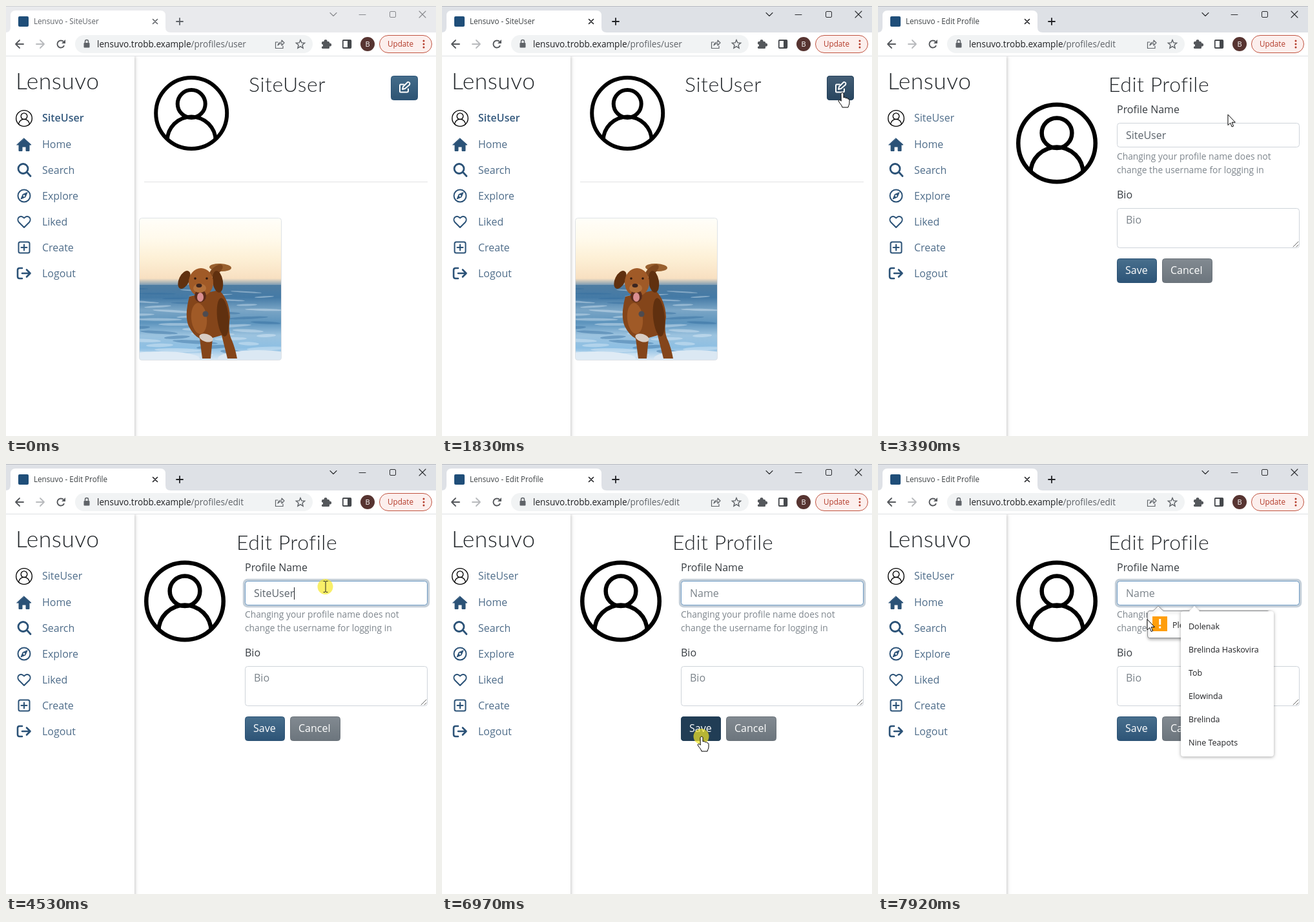
Recreate the animation shown at these times as an HTML page with a canvas. Size 666 by 666 pixels, loop 7.99 s.

```html
<!DOCTYPE html>
<html lang="en">
<head>
<meta charset="utf-8">
<title>Profile editor</title>
<style>
  html, body { margin: 0; width: 100%; height: 100%; overflow: hidden; background: #fff; }
  canvas { display: block; width: 666px; height: 666px; }
</style>
</head>
<body>
<canvas id="stage" width="666" height="666"></canvas>
<script>
const c = document.getElementById('stage').getContext('2d');
const LOOP = 7990;
const UI = '"Open Sans", "Noto Sans", sans-serif';
const HEAD = 'Lato, "Open Sans", sans-serif';
const APP = 'Lensuvo', USER = 'SiteUser', HOST = 'lensuvo.trobb.example';
const NAVY = '#2b5277', INK = '#212529', SOFT = '#383d42', GREY = '#5f6368';

const clamp = v => Math.max(0, Math.min(1, v));
const span = (t, a, b) => clamp((t - a) / (b - a));
const ease = p => p * p * (3 - 2 * p);
const mix = (a, b, p) => a + (b - a) * p;

function text(s, x, y, size, color, weight = 400, font = UI) {
  c.font = `${weight} ${size}px ${font}`;
  c.fillStyle = color;
  c.fillText(s, x, y);
  return c.measureText(s).width;
}
function heading(s, x, y, size) {
  c.letterSpacing = '0.5px';
  text(s, x, y, size, INK, 300, HEAD);
  c.letterSpacing = '0px';
}
function rect(x, y, w, h, color) {
  c.fillStyle = color;
  c.fillRect(x, y, w, h);
}
function round(x, y, w, h, r, fill, stroke, lw = 1) {
  c.beginPath();
  c.roundRect(x, y, w, h, r);
  if (fill) { c.fillStyle = fill; c.fill(); }
  if (stroke) { c.strokeStyle = stroke; c.lineWidth = lw; c.stroke(); }
}
function oval(x, y, rx, ry, turn, color) {
  c.beginPath();
  c.ellipse(x, y, rx, ry, turn, 0, 7);
  c.fillStyle = color;
  c.fill();
}
const disc = (x, y, r, color) => oval(x, y, r, r, 0, color);
// SVG path at an offset, filled and/or stroked
function shape(d, x, y, fill, stroke, lw = 2) {
  const p = new Path2D(d);
  c.save();
  c.translate(x, y);
  c.lineJoin = c.lineCap = 'round';
  if (fill) { c.fillStyle = fill; c.fill(p); }
  if (stroke) { c.strokeStyle = stroke; c.lineWidth = lw; c.stroke(p); }
  c.restore();
}
const line = (d, x, y, color, lw) => shape(d, x, y, null, color, lw);
function fade(y0, y1, ...colors) {
  const g = c.createLinearGradient(0, y0, 0, y1);
  colors.forEach((k, i) => g.addColorStop(i / (colors.length - 1), k));
  return g;
}
function alpha(a, draw) {
  if (a <= 0) return;
  c.save();
  c.globalAlpha = a;
  draw();
  c.restore();
}
function shadow(color, blur, dx, dy, draw) {
  c.save();
  c.shadowColor = color;
  c.shadowBlur = blur;
  c.shadowOffsetX = dx;
  c.shadowOffsetY = dy;
  draw();
  c.restore();
}

function tabStrip(active, title) {
  const strip = active ? '#dee1e6' : '#e9eaed';
  const ink = active ? '#2b2d30' : '#87898d';
  rect(0, 0, 666, 41, strip);
  rect(0, 0, 666, 1, active ? '#b9bcc2' : '#cfd1d4');
  shape('M-1 41Q7 41 7 33V15Q7 7 15 7H239Q247 7 247 15V33Q247 41 255 41Z', 0, 0, '#fff');
  round(19, 16, 16, 16, 2, '#1f4e79');
  text(title, 43, 28, 11.7, active ? '#3c4043' : GREY);
  line('M-3.5-3.5L3.5 3.5M3.5-3.5L-3.5 3.5', 231, 24, active ? '#202124' : GREY, 1.6);
  line('M-5 0H5M0-5V5', 269, 24, active ? '#202124' : GREY, 1.8);
  line('M-5-2.5L0 2.5L5-2.5', 507, 13, ink, 1.1);
  line('M-5 .5H5', 552, 13, ink, 1);
  round(594.5, 8.5, 9, 9, 1.5, null, ink);
  line('M-5-5L5 5M5-5L-5 5', 645, 13, ink, 1.1);
}

function star(x, y, r) {
  c.beginPath();
  for (let i = 0; i < 10; i++) {
    const a = i * Math.PI / 5 - Math.PI / 2, q = i % 2 ? r * .45 : r;
    c.lineTo(x + q * Math.cos(a), y + q * Math.sin(a));
  }
  c.closePath();
  c.strokeStyle = GREY;
  c.lineWidth = 1.4;
  c.stroke();
}

function toolbar(path) {
  rect(0, 41, 666, 36, '#fff');
  rect(0, 77, 666, 1, '#dfe0e3');
  const arrow = 'M6 0H-6M0-6L-6 0L0 6';
  line(arrow, 21, 59, '#55585c', 1.8);
  c.save();
  c.translate(53, 59);
  c.scale(-1, 1);
  line(arrow, 0, 0, '#b8babd', 1.8);
  c.restore();
  c.beginPath();
  c.arc(85, 59, 5.5, .4, 5.5);
  c.strokeStyle = '#55585c';
  c.lineWidth = 1.9;
  c.stroke();
  shape('M7-7V-1H1Z', 85, 59, '#55585c');
  round(107, 45, 368, 28, 14, '#f1f3f4');
  round(120.5, 57, 9, 7.5, 1, GREY);
  line('M-2.5-2V-4A2.5 2.5 0 0 1 2.5-4V-2', 125, 59, GREY, 1.5);
  const w = text(HOST, 141, 64, 13.6, '#202124');
  text(path, 141 + w, 64, 13.6, GREY);
  line('M-3-3H-6.5V6.5H5V3M-3 2Q-2-3 3-3V-6L7-2L3 2V-1Q-1-1-3 2Z', 424, 59, GREY, 1.2);
  star(456, 59.5, 7);
  round(489, 55, 12, 11, 1.5, '#55585c');
  disc(495, 54.5, 2.6, '#55585c');
  disc(501.5, 60, 2.6, '#55585c');
  disc(489, 61, 2.1, '#fff');
  round(521.8, 53, 12.5, 12, 1, '#fff', '#45484c', 1.8);
  rect(529, 53, 5, 12, '#45484c');
  disc(560, 59, 11, '#573431');
  text('B', 556.5, 63, 11, '#fff');
  round(578.5, 45.5, 81, 27, 13.5, '#fcefed', '#c0523f');
  text('Update', 591, 63, 11.7, '#b33a29');
  for (const y of [54, 59, 64]) disc(647, y, 1.5, '#b33a29');
}

function avatar(x, y, r) {
  c.save();
  c.translate(x, y);
  c.scale(r / 58, r / 58);
  c.strokeStyle = '#000';
  c.lineWidth = 6;
  const ring = (cy, q) => { c.beginPath(); c.arc(0, cy, q, 0, 7); c.stroke(); };
  ring(0, 55);
  ring(-14.5, 21.5);
  c.beginPath();
  c.arc(0, 0, 57, 0, 7);
  c.clip();
  ring(43, 37.5);
  c.restore();
}

function sidebar(bold) {
  shadow('rgba(0,0,0,.24)', 5, 1, 0, () => rect(-10, 78, 209, 600, '#fff'));
  heading(APP, 15, 129, 35.5);
  avatar(28, 174, 13);
  text(USER, 56, 179, 16, bold ? '#355a7e' : '#4f6d8a', bold ? 600 : 400);
  ['Home', 'Search', 'Explore', 'Liked', 'Create', 'Logout'].forEach((s, i) =>
    text(s, 56, 220 + 40 * i, 16, '#4f6d8a'));
  shape('M0-10L11 0H8V9.5H3V3H-3V9.5H-8V0H-11Z', 28, 215, NAVY, NAVY, 1);
  line('M5 4L10 9.5M6-2A7.5 7.5 0 1 1-9-2A7.5 7.5 0 1 1 6-2', 28, 254, NAVY, 2.8);
  line('M9.5 0A9.5 9.5 0 1 1-9.5 0A9.5 9.5 0 1 1 9.5 0', 28, 294, NAVY, 2);
  shape('M5-5L2 2L-5 5L-2-2Z', 28, 294, NAVY, NAVY, 1);
  disc(28, 294, 1.5, '#fff');
  line('M0 9L-8 1C-13-5-5-12 0-5.5C5-12 13-5 8 1Z', 28, 334, NAVY, 2);
  round(19.5, 365.5, 17, 17, 2.5, null, NAVY, 2);
  line('M-4.5 0H4.5M0-4.5V4.5', 28, 374, NAVY, 2);
  line('M-3-8H-7Q-10-8-10-5V5Q-10 8-7 8H-3M-3 0H8M4-5.5L9.5 0L4 5.5', 28, 414, NAVY, 2.6);
}

function photo() {
  c.save();
  c.beginPath();
  c.roundRect(206.5, 328.5, 220, 220, 4);
  c.clip();
  rect(206, 328, 221, 94, fade(328, 422, '#fffef9', '#fffaec', '#fdf0d6', '#f8e0c1'));
  rect(206, 422, 221, 10, fade(422, 432, '#f8e0c1', '#7d9bb3'));
  rect(206, 432, 221, 117, fade(432, 549, '#4f7da2', '#447aa6', '#7ba6c6', '#5d94bd', '#9cc3df', '#8dbfe3', '#dfebf5'));
  // swell and foam, growing towards the shore
  for (let i = 0; i < 44; i++) {
    const y = 438 + i * 2.5;
    oval(206 + (i * 83) % 221, y, 14 + (i * 29) % 24, 1 + i * .05, Math.sin(i) * .06,
      i % 3 ? 'rgba(232,242,250,.38)' : 'rgba(48,106,156,.42)');
  }
  oval(240, 546, 60, 11, 0, '#dfebf5');
  oval(390, 546, 62, 13, 0, '#dbe8f3');
  const fur = '#84451a', dark = '#60300f', lit = '#a05a27';
  oval(332, 405, 17, 6, .05, '#99602f');
  oval(325, 410, 13, 6, -.7, '#7e471e');
  shape('M284 450Q276 480 283 496Q290 510 300 515L304 546H317L320 514L334 510L343 546H358Q355 530 350 518Q343 505 347 482Q346 455 330 440Z', 0, 0, fur);
  oval(336, 482, 9, 30, -.1, dark);
  oval(299, 484, 12, 24, -.1, lit);
  oval(310, 514, 11, 6, .3, '#d9cdc4');
  oval(276, 424, 8, 15, .45, dark);
  oval(328, 427, 8, 17, -.15, dark);
  oval(302, 428, 19, 22, 0, lit);
  oval(301, 449, 9, 10, 0, '#5a2c1b');
  oval(301, 451, 5, 7, 0, '#d98e91');
  oval(300, 437, 10, 7, 0, '#b3713b');
  oval(299, 433, 4.5, 3, 0, '#3b2520');
  disc(293, 422, 1.8, '#2c1810');
  disc(311, 422, 1.8, '#2c1810');
  disc(309, 477, 4.5, '#4d4b50');
  c.restore();
  round(206.5, 328.5, 220, 220, 4, null, '#dee2e6');
}

function profile(hover, pressed) {
  avatar(287.2, 166, 58);
  heading(USER, 376, 133, 32);
  round(596.5, 108.5, 41, 37, 4, fade(108, 146, '#456d8b', '#2c5373'), '#2b5275');
  alpha(hover, () => round(596.5, 108.5, 41, 37, 4,
    pressed ? '#213f59' : fade(108, 146, '#445e76', '#28455f'), '#25415a'));
  line('M-1-5H-6Q-7-5-7-3V6Q-7 7-6 7H4Q6 7 6 5V2', 617, 126.5, '#fff', 2);
  shape('M-3 2L-2-2L5-9Q6-10 8-8Q9-7 8-5L1 1Z', 617, 127, null, '#fff', 1.9);
  rect(214, 272, 439, 1, '#e1e2e3');
  photo();
}

function button(s, x, w, top, bottom, edge) {
  round(x + .5, 391.5, w - 1, 37, 4, fade(391, 429, top, bottom), edge);
  text(s, x + 13, 415, 16, '#fff', 500);
}

function form(s) {
  heading('Edit Profile', 357, 133, 32);
  if (s.avatar) avatar(277, 212.5, 63);
  text('Profile Name', 370, 166, 16, SOFT);
  alpha(s.focus, () => round(368.5, 179.5, 286, 41, 5.5, null, 'rgba(43,82,119,.28)', 3.4));
  round(370.5, 181.5, 282, 37, 4, '#fff', '#ced4da');
  alpha(s.focus, () => round(370.5, 181.5, 282, 37, 4, null, '#6f9cc5'));
  const w = text(s.filled ? USER : 'Name', 384, 206, 16, s.filled ? '#5b636b' : '#7b838a');
  if (s.select < w) {
    const x = 384 + s.select;
    rect(x, 191, w - s.select, 19, '#0078d7');
    c.save();
    c.beginPath();
    c.rect(x, 185, w, 30);
    c.clip();
    text(USER, 384, 206, 16, '#fff');
    c.restore();
  }
  if (s.caret) rect(s.filled ? 384 + Math.round(w) : 383, 191, 1, 19, '#1b1f23');
  text('Changing your profile name does not', 370, 238, 13.8, '#7e868d');
  text('change the username for logging in', 370, 259, 13.8, '#7e868d');
  text('Bio', 370, 298, 16, SOFT);
  round(370.5, 313.5, 282, 61, 4, '#fff', '#ced4da');
  text('Bio', 384, 337, 16, '#7b838a');
  line('M-8 0L0-8M-3 0L0-3', 651, 373, '#666', 1);
  alpha(s.saveRing, () => round(368.5, 389.5, 65, 41, 5.5, null, 'rgba(43,82,119,.4)', 3));
  button('Save', 370, 62, '#486f8d', '#2d5477', '#2b5275');
  alpha(s.hover, () => button('Save', 370, 62, s.pressed ? '#213d55' : '#445e76',
    s.pressed ? '#213d55' : '#28455f', '#213d55'));
  button('Cancel', 440, 78, '#828a91', '#6c757d', '#6a7279');
}

function bubble() {
  shadow('rgba(0,0,0,.3)', 4, 1, 2, () =>
    shape('M420.5 227.5H426L434 220L442 227.5H603Q606.5 227.5 606.5 231V266Q606.5 269.5 603 269.5H420.5Q417.5 269.5 417.5 266V231Q417.5 227.5 420.5 227.5Z', 0, 0, '#fff', '#8d8f92', 1));
  rect(425, 236, 23, 23, '#ff9e0b');
  rect(435.2, 240, 3, 9, '#fff');
  rect(435.2, 251.5, 3, 3, '#fff');
  text('Please fill out this field.', 456, 254, 12.5, '#222');
}

function suggestions() {
  shadow('rgba(0,0,0,.35)', 5, 0, 1, () =>
    shape('M473 228H482L490 220L498 228H609Q613 228 613 232V449Q613 453 609 453H473Q469 453 469 449V232Q469 228 473 228Z', 0, 0, '#fff'));
  ['Dolenak', 'Brelinda Haskovira', 'Tob', 'Elowinda', 'Brelinda', 'Nine Teapots'].forEach((s, i) =>
    text(s, 481, 256 + 36 * i, 12.5, '#202124'));
}

const cursors = {
  arrow: 'M0 0V16L3.8 12.5L6.2 18.5L8.6 17.4L6.2 11.6H11Z',
  hand: 'M-2 2C-2-.5 2-.5 2 2V8C3.5 7 5.3 7.5 5.6 9C7 8.2 8.6 8.8 8.8 10.2C10.2 9.8 11 10.8 11 12V16C11 19 9.5 20 9 23H0C-.5 20-3 18-5.5 14C-6.8 11.5-4 10.5-2 13Z'
};
function cursor(kind, x, y) {
  if (kind === 'beam')
    line('M-3-8.5H-1L0-7.5L1-8.5H3M0-7.5V7.5M-3 8.5H-1L0 7.5L1 8.5H3', x, y, '#222', 1);
  else
    shape(cursors[kind], x, y, '#fff', '#000', 1);
}

// start, end, from x, y, to x, y
const moves = [
  [3000, 3670, 620, 133, 495, 190],
  [4540, 5070, 495, 190, 355, 197],
  [5980, 6570, 353, 194, 402, 422],
  [7540, 7910, 402, 422, 417, 241]
];
function pointer(t) {
  if (t < 3000) {
    const p = ease(span(t, 400, 1270)), q = 1 - p;
    return [q * q * 588 + 2 * p * q * 660 + p * p * 620, mix(672, 134, p)];
  }
  const [a, b, x0, y0, x1, y1] = moves.filter(m => t >= m[0]).pop();
  const p = ease(span(t, a, b));
  return [mix(x0, x1, p), mix(y0, y1, p)];
}

function draw(t) {
  const editing = t >= 2170, [x, y] = pointer(t);
  const onSave = editing && y > 391 && y < 429 && x > 370 && x < 432;
  rect(0, 0, 666, 666, '#fff');
  if (editing) {
    const blur = ease(span(t, 6980, 7110)) - ease(span(t, 7130, 7280));
    form({
      avatar: t >= 2850,
      filled: t < 6000,
      focus: ease(span(t, 4180, 4330)) - blur,
      saveRing: blur,
      select: t > 4540 && t < 6000 ? Math.max(0, x - 384) : 999,
      caret: t >= 4200 && t < 4750 || t >= 6000 && t < 6530,
      hover: onSave ? 1 : t > 7600 ? 1 - span(t, 7770, 7910) : 0,
      pressed: t >= 6960 && t < 7120
    });
  } else {
    profile(span(t, 1080, 1230), t >= 1480 && t < 1640);
  }
  sidebar(!editing);
  tabStrip(t >= 1480, APP + ' - ' + (t < 2510 ? USER : 'Edit Profile'));
  toolbar(editing ? '/profiles/edit' : '/profiles/user');
  alpha(span(t, 7720, 7900), bubble);
  if (t >= 7450) suggestions();

  const click = t >= 1480 && t < 1640 || t >= 4200 && t < 5040 || t >= 6960 && t < 7120;
  if (click) disc(x - .5, y, 12, 'rgba(246,232,40,.7)');
  let kind = 'arrow';
  if (!editing && y < 146 || t >= 2170 && t < 2250 || onSave) kind = 'hand';
  if (t > 3500 && t < 6000) kind = 'beam';
  if (t >= 500) cursor(kind, x, y);
}

function tick() {
  draw(performance.now() % LOOP);
  requestAnimationFrame(tick);
}
tick();
</script>
</body>
</html>
```
